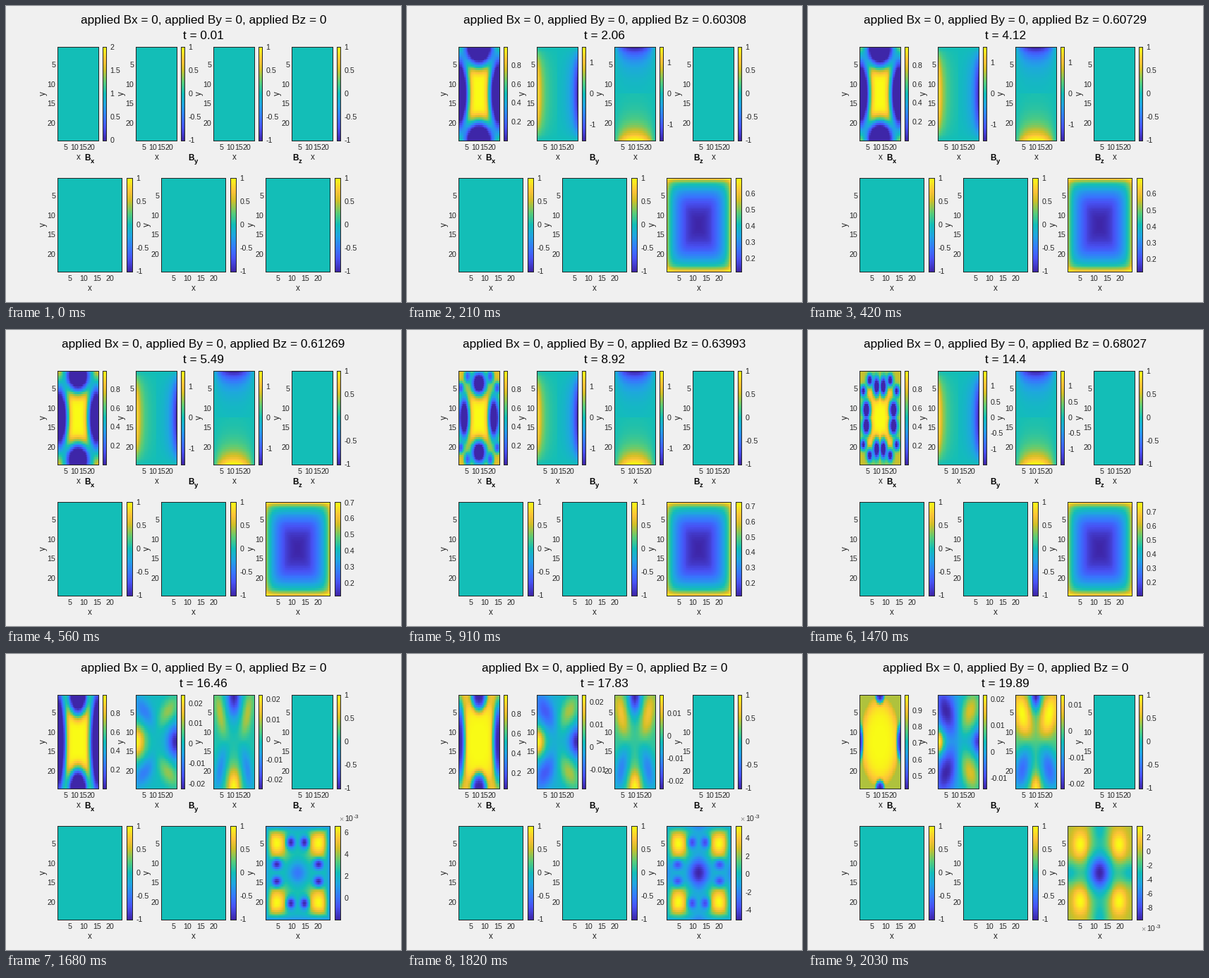
Animation, 560 px wide and 420 px high, one loop 2100 ms. Source, as a matplotlib script:

```python
import numpy as np
import matplotlib.pyplot as plt
from matplotlib.animation import FuncAnimation
from matplotlib.colors import LinearSegmentedColormap

W, H, FRAMES, STEP_MS = 560, 420, 30, 70
OFF, SETTLED = 21, 24          # field switched off, currents decayed
CELLS, N = 24, 48
INK = "#262626"
TICK, LABEL, TITLE = 10.67, 11.7, 17.3
plt.rcParams["font.family"] = "Liberation Sans"

PARULA = LinearSegmentedColormap.from_list("parula", [
    (0, "#3e26a8"), (.14, "#4852f4"), (.24, "#3875fe"), (.38, "#20a5e2"), (.5, "#12beb9"),
    (.62, "#57cc7a"), (.76, "#d1bf27"), (.86, "#fec338"), (1, "#f9fb15")])

axis = (np.arange(N) + .5) / N * 2 - 1
X, Y = np.meshgrid(axis, axis)
U, V = np.abs(X), np.abs(Y)
EDGE = np.maximum(U, V)


def ease(f, start, end):
    p = np.clip((f - start) / (end - start), 0, 1)
    return p * p * (3 - 2 * p)


def mix(a, b, p):
    return a + (b - a) * p


def bump(a, b, ca, cb, sa, sb):
    return np.exp(-((a - ca) / sa) ** 2 - ((b - cb) / sb) ** 2)


def unit(z):
    return (z - z.min()) / (z.max() - z.min())


def fade(f):
    return np.clip((SETTLED - f) / (SETTLED - OFF), 0, 1) ** 4


def heal(f):
    return (f - SETTLED) / (FRAMES - 1 - SETTLED) if f > SETTLED else 0


def density(f):
    """Vortices enter from the edges, split, and leave when the field goes."""
    if f == 0:
        return np.ones((N, N))
    off, h = ease(f, OFF, SETTLED), heal(f)
    inn, late = ease(f, 3, 17) * (1 - off), ease(f, 6, 17) * (1 - off)
    split = ease(f, 17, OFF) * (1 - off)
    grown = min(1, .7 + .1 * f) * (1 - .6 * h)
    depth = 1.25 - .75 * h
    blobs = [
        (1 - .34 * inn, .17 * split, grown * (.52 - .3 * inn - .08 * off),
         grown * (.9 - .5 * inn - .18 * split + .4 * off * (1 - h)), depth),
        (.17 * split, 1 - .33 * inn, grown * (.8 - .5 * inn - .12 * split - .3 * off),
         grown * (.45 - .22 * inn), depth),
        (mix(.7, .5, late), mix(1.1, .8, late), .15, .14, 1.1 * late),
        (mix(1.1, .81, late), mix(.8, .57, late), .15, .12, 1.1 * late)]
    z = 1 - (.25 * inn + .16 * off) * np.minimum(1, U ** 2 + V ** 2) ** 2
    for cu, cv, su, sv, deep in blobs:
        d = np.hypot((U - cu) / su, (V - cv) / sv)
        z = z * np.clip(1 - deep * np.exp(-d ** (3.5 - 1.3 * inn)), 0, 1)
    return np.clip(.995 * z, .004, 1)


def current(f, a, b):
    """Edge current along one axis: screening first, trapped flux later."""
    if f == 0:
        return np.zeros((N, N))
    A, B, h = np.abs(a), np.abs(b), heal(f)
    screen = (1.52 - .04 * (f / OFF) ** 4) * np.exp((A - axis[-1]) / .28) * (1 - B ** 2.2)
    core = np.where(a < 0, .0245 - .0023 * h, .0225 - .01 * h)
    core = core * bump(A, B, 1, 0, .45 - .15 * h, .33 - .08 * h)
    lobe = (.01 + .0038 * h) * np.sin(2.65 * A)
    lobe = lobe * np.exp(-((B - .45 - .35 * A) / (.26 + .18 * h)) ** 2)
    k = fade(f)
    return -np.sign(a) * (k * screen + (1 - k) * (core - lobe))


def field_z(f, applied_z):
    if f == 0:
        return np.zeros((N, N))
    if f <= OFF:
        lo, hi = (.13 - .02 * f / OFF) * (1 - np.exp(-f)), applied_z + .092
        pu = .5 * U ** 1.9 + .12 * U ** 16
        pv = .55 * V ** 2.1 + .25 * V ** 20
        return lo + (hi - lo) * unit(np.cbrt(pu ** 3 + pv ** 3))
    h, k = heal(f), fade(f)
    spots = (.22 + .5 * bump(U, V, .66, .64, .34, .34) - .62 * bump(U, V, .22, .65, .14, .14)
             - .62 * bump(U, V, .65, .19, .16, .12) - .28 * bump(U, V, 0, 0, .3, .25))
    spots = spots * (1 - EDGE ** 10)
    cross = (.68 + .3 * bump(U, V, .6, .6, .24, .3) - .75 * bump(U, V, 0, 0, .36, .4)
             - .26 * bump(U, V, 1, 0, .45, .25) - .26 * bump(U, V, 0, 1, .25, .45))
    lo, hi = -1.95 - 7.7 * h, 6.6 - 3 * h
    trapped = 1e-3 * (lo + (hi - lo) * unit(mix(unit(spots), unit(cross), h)))
    return .5 * k * (1 - U ** 2) * (1 - V ** 2) + (1 - k) * trapped


# Slow S-shaped rise of the applied field through a few readings
RISE = .088
seen = np.array([.00308, .01269, .06589, .08027])
S_CURVE = np.polyfit([2.06, 5.49, 11.66, 14.4], np.log(seen / (RISE - seen)), 3)


def applied(f, t):
    return .6 + RISE / (1 + np.exp(-np.polyval(S_CURVE, t))) if 0 < f <= OFF else 0


def ticks(lo, hi):
    for e in range(-4, 3):
        for m in (1, 2, 5):
            step = m * 10.0 ** e
            n = np.arange(np.ceil(lo / step - 1e-6), np.floor(hi / step + 1e-6) + 1)
            if len(n) <= 6:
                return n * step
    return []


fig = plt.figure(figsize=(W / 100, H / 100), dpi=100, facecolor="#f0f0f0")
page = fig.add_axes([0, 0, 1, 1], zorder=5)
page.set(xlim=(0, W), ylim=(H, 0))
page.axis("off")


def write(x, y, s, size=TICK, ha="left", va="baseline", color=INK, **kw):
    return page.text(x, y, s, fontsize=size * .72, ha=ha, va=va, color=color, **kw)


def box(x, y, w, h, data):
    ax = fig.add_axes([x / W, 1 - (y + h) / H, w / W, h / H])
    im = ax.imshow(data, cmap=PARULA, aspect="auto", interpolation="nearest")
    ax.set(xticks=[], yticks=[])
    for s in ax.spines.values():
        s.set(color=INK, linewidth=.72)
    return im


class Panel:
    def __init__(self, x, y, w, gap, bar_w):
        self.y, self.h = y + .5, 133
        bar = x + gap
        self.im = box(x, y + 1, w, self.h, np.zeros((N, N)))
        box(bar, y + 1, bar_w, self.h, np.linspace(1, 0, 256)[:, None])
        left = bar + bar_w + 5.5
        self.labels = [write(left, 0, "") for _ in range(6)]
        self.power = [write(left - 7, 0, "×", color="#8c8c8c"),
                      write(left + 1, 0, "10"),
                      write(left + 13.4, 0, "-3", size=8.5)]
        for v in (5, 10, 15, 20):
            at = (v - .5) / CELLS
            write(x + .7 + at * w, y + 147, str(v), ha="center")
            write(x - 3, y + 5 + at * self.h, str(v), ha="right")
        write(x + w / 2 + .5, y + 161.5, "x", LABEL, "center")
        write(x - 20.5, y + 67, "y", LABEL, "center", "center", rotation=90)

    def show(self, z):
        lo, hi = z.min(), z.max()
        if hi - lo < 1e-9:
            lo, hi = lo - 1, hi + 1
        self.im.set_data(z)
        self.im.set_clim(lo, hi)
        small = max(abs(lo), abs(hi)) < .01
        for lab in self.labels:
            lab.set_text("")
        for lab, v in zip(self.labels, ticks(lo, hi)):
            lab.set_text(f"{round(v * (1000 if small else 1), 6) + 0:g}")
            lab.set_y(self.y + self.h * (hi - v) / (hi - lo) + 4)
        base = self.y + (149.5 if -lo > hi else -6.5)
        for part, lift in zip(self.power, (0, 0, 4)):
            part.set_visible(small)
            part.set_y(base - lift)


top = [Panel(round(73.1 + 110.6 * i), 57, 58, 64, 5) for i in range(4)]
low = [Panel(round(73 + 147.4 * i), 243, 91, 98, 8) for i in range(3)]
for i, name in enumerate("xyz"):
    c = 118.3 + 147.4 * i
    write(c - 7, 219, "B", LABEL, color="k", weight="bold")
    write(c + 1.6, 223, name, LABEL * .8, color="k", weight="bold")
head = write(W / 2, 25, "", TITLE, "center", color="k")
clock = write(W / 2, 47, "", TITLE, "center", color="k")


def draw(f):
    t = int(1 + 68.5518 * f) / 100
    bz = applied(f, t)
    head.set_text(f"applied Bx = 0, applied By = 0, applied Bz = {bz:.5g}")
    clock.set_text(f"t = {t:g}")
    zero = np.zeros((N, N))
    fields = [density(f), current(f, X, Y), -current(f, Y, X),
              zero, zero, zero, field_z(f, bz)]
    for panel, z in zip(top + low, fields):
        panel.show(z)
    return []


anim = FuncAnimation(fig, draw, frames=FRAMES, interval=STEP_MS, repeat=True,
                     repeat_delay=0, blit=False)
plt.show()
```
